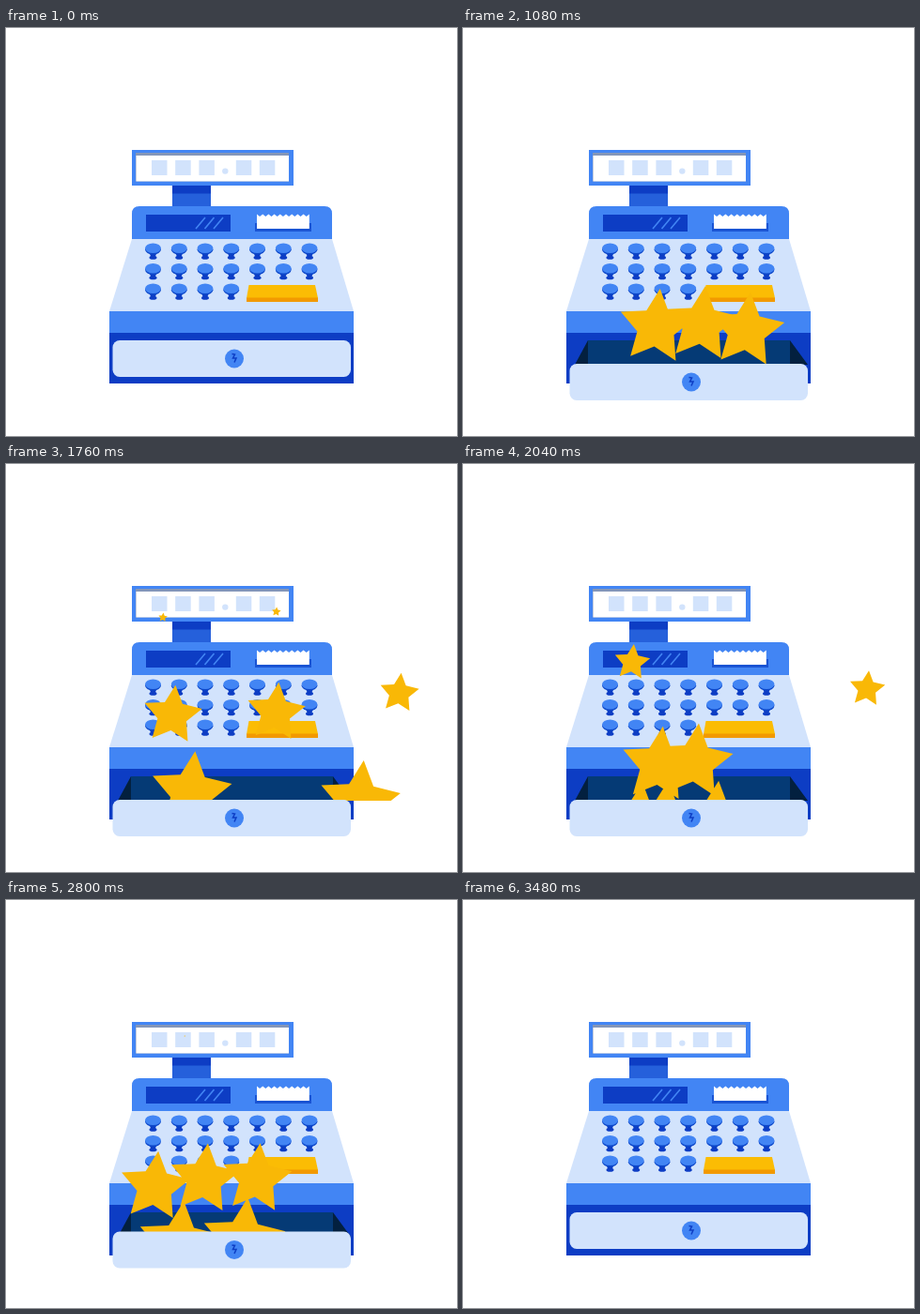
Animation, 480 px wide and 435 px high, one loop 4.16 s. Source, as an HTML page:

```html
<!DOCTYPE html>
<html lang="en">
<head>
<meta charset="utf-8">
<title>Cash register</title>
<style>
  html, body { margin: 0; width: 100%; height: 100%; overflow: hidden; background: #fff; }
  svg { display: block; width: 100%; height: 100%; }
</style>
</head>
<body>
<svg viewBox="0 0 480 435">
  <defs>
    <clipPath id="aboveDrawer"><rect id="clip" width="480" height="358"/></clipPath>
    <g id="key">
      <path d="M-4 4H4L2 9H-2Z" fill="#0d3dc4"/>
      <ellipse cy="9.3" rx="4" ry="2" fill="#0d3dc4"/>
      <ellipse cy=".8" rx="8.4" ry="5.4" fill="#0d47c9"/>
      <ellipse cy="-.8" rx="8.4" ry="5.2" fill="#4285f4"/>
    </g>
  </defs>

  <rect x="134" y="130" width="172" height="38" fill="#4285f4"/>
  <rect x="138" y="133" width="163" height="30.5" fill="#8496b8"/>
  <rect x="138.5" y="136" width="162.5" height="27.5" fill="#fff"/>
  <g id="digits" fill="#d2e3fc"><circle cx="233.3" cy="152.6" r="3.2"/></g>
  <rect x="177" y="168" width="41" height="23" fill="#2560db"/>
  <rect x="177" y="168" width="41" height="8.5" fill="#0d3dc4"/>

  <path d="M134 225V198Q134 190 142 190H339Q347 190 347 198V225Z" fill="#4285f4"/>
  <rect x="149" y="199" width="90" height="18" fill="#0d3dc4"/>
  <path d="M202 214l10-12m-.5 12l10-12m-.5 12l10-12" stroke="#4285f4" stroke-width="1.6"/>
  <rect x="265" y="208" width="60" height="9" fill="#1a54d4"/>
  <path id="paper" fill="#fff"/>

  <path d="M134 225H347L370 302H110Z" fill="#d2e3fc"/>
  <g id="keys"></g>
  <path d="M258.500 274H329L332 288H256Z" fill="#fbbc04"/>
  <rect x="256" y="287.5" width="76" height="4.5" fill="#f29900"/>
  <rect x="110" y="302" width="260" height="23" fill="#4285f4"/>
  <rect x="110" y="325" width="260" height="54" fill="#0d3dc4"/>

  <path d="M133 333H348L367 359H119Z" fill="#03203f"/>
  <rect x="133" y="333" width="215" height="26" fill="#053a75"/>
  <g clip-path="url(#aboveDrawer)"><path id="stars" fill="#f9b806"/></g>
  <g id="drawer">
    <rect x="113.5" y="333" width="253.5" height="39" rx="7.5" fill="#d2e3fc"/>
    <circle cx="243" cy="352.5" r="10" fill="#4285f4"/>
    <path d="M240.500 347.500l3 .5-2 4h3.500l-2 4.500" fill="none" stroke="#0d3dc4" stroke-width="1.5"/>
  </g>
</svg>
<script>
const LOOP = 4160, STEP = 40, LIFE = 560;
const CENTER = 240, FLOOR = 425, PEAK = 130, RADIUS = 48, TILT = .1;
const $ = id => document.getElementById(id);

// Launch time: x positions the stars of that burst fly towards
const bursts = {
  870: [190, 260, 330],
  1130: [188, 269, 375],
  1230: [165, 289],
  1345: [445],
  1440: [160, 300],
  1610: [172, 455],
  1835: [194, 250],
  1960: [146, 194, 288],
  2245: [190],
  2550: [127, 200, 277],
  2680: [149, 261],
  2760: [180, 300],
  2860: [85, 410]
};

const ease = (t, from, to) => {
  const u = Math.min(1, Math.max(0, (t - from) / (to - from)));
  return u * u * (3 - 2 * u);
};

function starPath(x, y, r) {
  const points = Array.from({ length: 10 }, (_, i) => {
    const a = i * Math.PI / 5 + TILT, d = i % 2 ? r / 2 : r;
    return (x + d * Math.sin(a)).toFixed(2) + ' ' + (y - d * Math.cos(a)).toFixed(2);
  });
  return 'M' + points.join('L') + 'Z';
}

// Stars rise and fan out from the drawer while shrinking to nothing.
function flyingStar(age, aim) {
  const p = age / LIFE;
  if (p <= 0 || p >= 1) return '';
  const spread = aim - CENTER;
  const rise = FLOOR - PEAK - Math.abs(spread) / 4;
  return starPath(CENTER + spread * (1 + p) / 2, FLOOR - rise * p, RADIUS * (1 - p * p));
}

function draw(now) {
  const t = Math.floor(now % LOOP / STEP) * STEP;
  const offset = -2 * ease(t, 40, 700) + 27 * ease(t, 740, 960) - 25 * ease(t, 2725, 3000);
  $('drawer').setAttribute('transform', `translate(0 ${offset})`);
  $('clip').setAttribute('height', 334 + offset);
  $('stars').setAttribute('d', Object.entries(bursts).flatMap(([start, aims]) =>
    aims.map(aim => flyingStar(t - start, aim))).join(''));
}

function frame() {
  draw(performance.now() - start);
  requestAnimationFrame(frame);
}

$('digits').innerHTML += [155, 180.2, 205.4, 244.8, 269.8].map(x =>
  `<rect x="${x}" y="141" width="16.5" height="16"/>`).join('');
$('paper').setAttribute('d', 'M267 214V198.5' + 'l3.1 2.5 3.1-2.5'.repeat(9) + 'V214Z');
$('keys').innerHTML = Array.from({ length: 18 }, (_, i) =>
  `<use href="#key" x="${156.5 + i % 7 * 27.75}" y="${235.5 + Math.floor(i / 7) * 21.5}"/>`).join('');
const start = performance.now();
frame();
</script>
</body>
</html>
```
